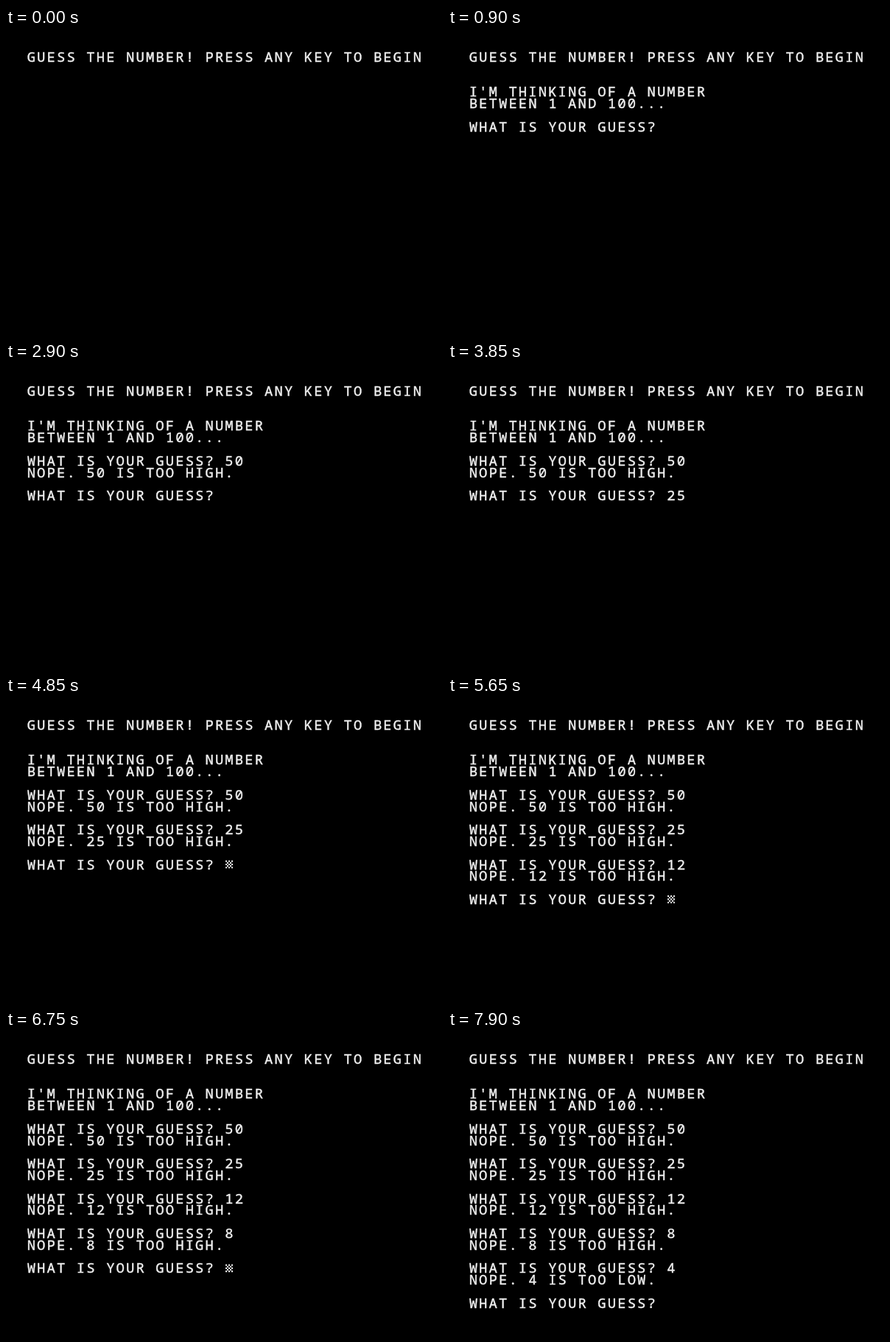
An HTML page for the animation above (8 s loop, 592x416 px).

```html
<!DOCTYPE html>
<html lang="en">
<head>
<meta charset="utf-8">
<title>Guess the number</title>
<style>
  html, body { margin: 0; width: 100%; height: 100%; overflow: hidden; background: #000; }
  svg { display: block; width: 100vw; height: 100vh; }
  text {
    font: 500 18.9px "Noto Sans Mono", "DejaVu Sans Mono", monospace;
    letter-spacing: 2.1px;
    font-variant-ligatures: none;
    fill: #f0f0f0;
    stroke: #f0f0f0;
    stroke-width: .45px;
  }
</style>
</head>
<body>
<svg viewBox="0 0 592 416">
  <rect width="592" height="416" fill="#000"/>
  <g id="screen"></g>
  <path id="cursor" fill="#e4e4e4"/>
</svg>
<script>
const LOOP = 8000, START = 650, BLINK = 248;
const COL = 13.44, ROW = 15.81, LEFT = 28.7, BASE = 45.9;
const PROMPT = 'WHAT IS YOUR GUESS? ';

// One guess each: when its digits are typed, when it is entered, when the reply is printed
const guesses = [
  { n: '50', keys: [1850, 1950], enter: 2100, reply: 2250, verdict: 'HIGH' },
  { n: '25', keys: [3550, 3600], enter: 3850, reply: 3900, verdict: 'HIGH' },
  { n: '12', keys: [4900, 5000], enter: 5100, reply: 5300, verdict: 'HIGH' },
  { n: '8', keys: [6350], enter: 6450, reply: 6500, verdict: 'HIGH' },
  { n: '4', keys: [7450], enter: 7450, reply: 7850, verdict: 'LOW' },
  { n: '', keys: [], enter: LOOP, reply: LOOP }
];

const screen = document.getElementById('screen');
const cursor = document.getElementById('cursor');
const lines = [];
for (let row = 0; row < 22; row++) {
  const line = document.createElementNS('http://www.w3.org/2000/svg', 'text');
  line.setAttribute('x', LEFT);
  line.setAttribute('y', (BASE + row * ROW).toFixed(2));
  lines.push(screen.appendChild(line));
}

// Checkerboard block
const dotW = 2, dotH = 2.15;
let checks = '';
for (let r = 0; r < 5; r++)
  for (let c = r % 2; c < 5; c += 2)
    checks += `M${c * dotW} ${r * dotH}h${dotW}v${dotH}h${-dotW}z`;
cursor.setAttribute('d', checks);

function layout(t) {
  const rows = ['GUESS THE NUMBER! PRESS ANY KEY TO BEGIN'];
  let caret = null;
  if (t < START) return { rows, caret };
  rows[3] = "I'M THINKING OF A NUMBER";
  rows[4] = 'BETWEEN 1 AND 100...';
  const lit = Math.floor((t - START) / BLINK) % 2 === 0;
  let row = 6;
  for (const g of guesses) {
    const typed = g.keys.filter(k => t >= k).length;
    rows[row] = PROMPT + g.n.slice(0, typed);
    if (t < g.reply) {
      const done = typed > 0 && typed === g.n.length;
      if (t < g.enter && (lit || done)) caret = { row, col: PROMPT.length + typed };
      break;
    }
    rows[row + 1] = `NOPE. ${g.n} IS TOO ${g.verdict}.`;
    row += 3;
  }
  return { rows, caret };
}

function draw(t) {
  const { rows, caret } = layout(t);
  lines.forEach((line, i) => {
    const s = rows[i] || '';
    if (line.textContent !== s) line.textContent = s;
  });
  cursor.style.display = caret ? '' : 'none';
  if (caret) {
    const x = 29.2 + caret.col * COL, y = 33.9 + caret.row * ROW;
    cursor.setAttribute('transform', `translate(${x} ${y})`);
  }
}

const began = performance.now();
function tick() {
  draw((performance.now() - began) % LOOP);
  requestAnimationFrame(tick);
}
tick();
</script>
</body>
</html>
```
